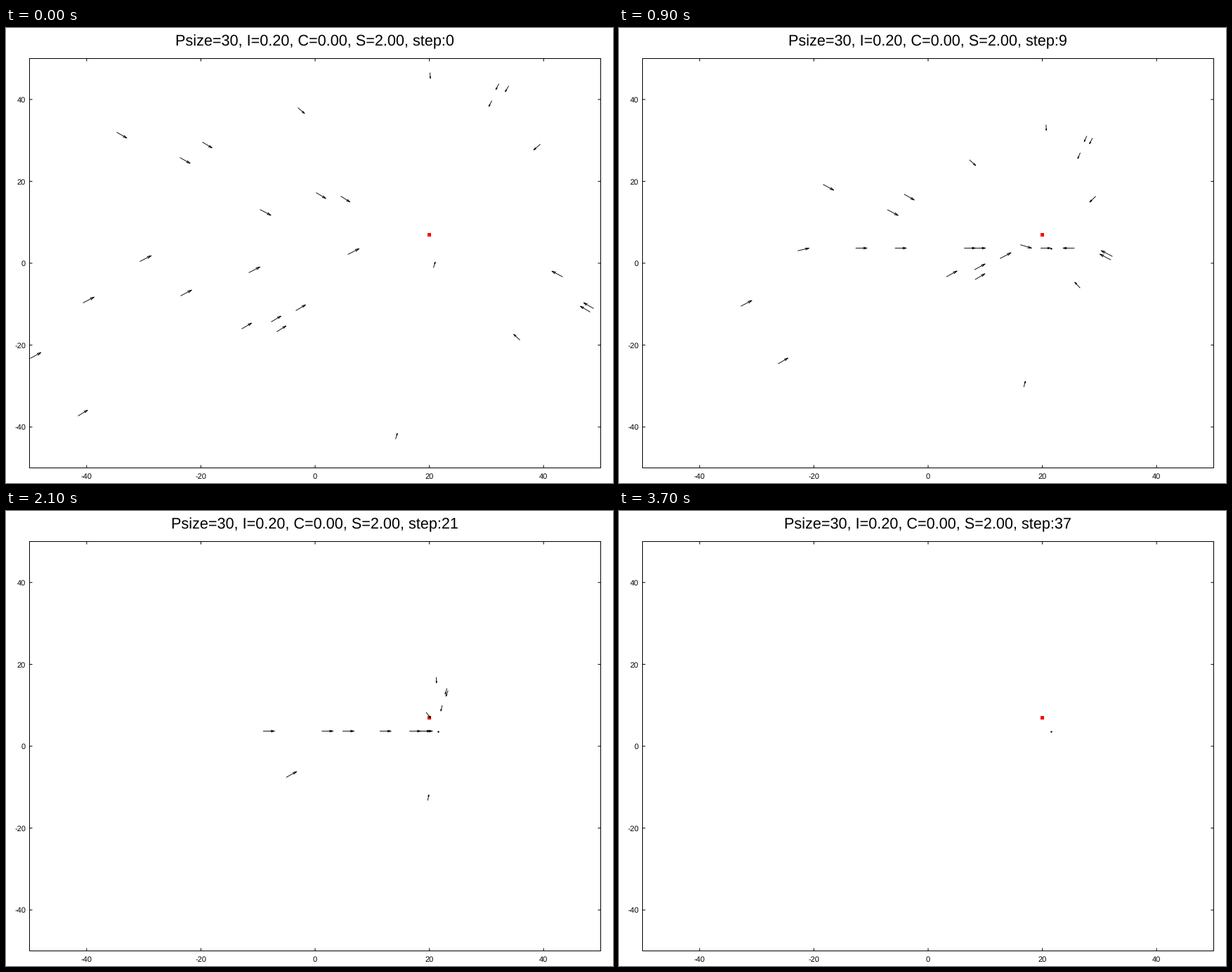
Write a matplotlib script that moves like this. It is 864x648 px and loops after 3.8 s.

```python
import numpy as np
import matplotlib.pyplot as plt
from matplotlib.animation import FuncAnimation
from matplotlib.collections import LineCollection

W, H = 864, 648
STEPS = 38
LEFT, RIGHT, TOP, BOTTOM = 33.5, 846.5, 43.5, 626.5
UNIT = np.array([RIGHT - LEFT, BOTTOM - TOP]) / 100   # pixels per axis unit
GOAL = np.array([614.5, 313.5])

plt.rcParams["font.family"] = "Liberation Sans"
plt.rcParams["text.hinting"] = "none"

starts = np.array([
    (157, 148), (279, 162), (247, 184), (415, 113), (441, 234), (476, 239),
    (361, 258), (603, 63), (701, 79), (715, 82), (691, 103), (760, 165),
    (486, 322), (608, 341), (190, 332), (345, 348), (109, 391), (248, 381),
    (335, 428), (377, 418), (385, 432), (412, 402), (34, 470), (102, 552),
    (554, 585), (792, 354), (836, 399), (831, 404), (731, 444)]) + 0.5


def advance(pos):
    """One step to the goal: x slows with the bearing, y has a fixed pace."""
    gap = (GOAL - pos) / UNIT
    distance = np.maximum(np.hypot(*gap.T), 1e-9)
    limit = np.column_stack([2 * np.abs(gap[:, 0]) / distance,
                             np.full(len(pos), np.sqrt(2))])
    return pos + np.clip(gap, -limit, limit) * UNIT


track = [starts]
for _ in range(STEPS):
    track.append(advance(track[-1]))


def arrow(tail, tip, spread=np.radians(15), ratio=0.34):
    back = (tail - tip) * ratio
    c, s = np.cos(spread), np.sin(spread)
    barbs = [tip + np.array([[c, -k], [k, c]]) @ back for k in (s, -s)]
    return [[tail, tip], [barbs[0], tip, barbs[1]]]


fig = plt.figure(figsize=(W / 72, H / 72), dpi=72, facecolor="white")
ax = fig.add_axes([0, 0, 1, 1])
ax.set(xlim=(0, W), ylim=(H, 0))
ax.axis("off")


def line(xs, ys):
    ax.plot(xs, ys, color="black", lw=1, solid_capstyle="butt",
            solid_joinstyle="miter", snap=False)


line([LEFT, RIGHT, RIGHT, LEFT, LEFT, RIGHT], [TOP, TOP, BOTTOM, BOTTOM, TOP, TOP])
for value in range(-40, 41, 20):
    x = LEFT + (value + 50) * UNIT[0]
    y = BOTTOM - (value + 50) * UNIT[1]
    for edge, inward in ((TOP, 4), (BOTTOM, -4)):
        line([x, x], [edge, edge + inward])
    for edge, inward in ((LEFT, 4), (RIGHT, -4)):
        line([edge, edge + inward], [y, y])
    ax.text(x, 642, str(value), size=11, ha="center", va="baseline")
    ax.text(28, y + 4, str(value), size=11, ha="right", va="baseline")

ax.add_patch(plt.Rectangle((600, 292), 5, 5, color="red", lw=0))
title = ax.text(439.8, 25, "", size=21.6, ha="center", va="baseline")
arrows = ax.add_collection(
    LineCollection([], colors="black", linewidths=0.9, snap=False))
dot, = ax.plot(*GOAL, "o", color="black", ms=2.4, mew=0)


def update(step):
    title.set_text(f"Psize=30, I=0.20, C=0.00, S=2.00, step:{step}")
    tails, tips = track[step], track[step + 1]
    moving = np.hypot(*(tips - tails).T) > 0.3
    arrows.set_segments([part for tail, tip in zip(tails[moving], tips[moving])
                         for part in arrow(tail, tip)])
    dot.set_visible(not moving.all())
    return title, arrows, dot


anim = FuncAnimation(fig, update, frames=STEPS, interval=100, repeat=True,
                     repeat_delay=0, blit=False)
plt.show()
```
